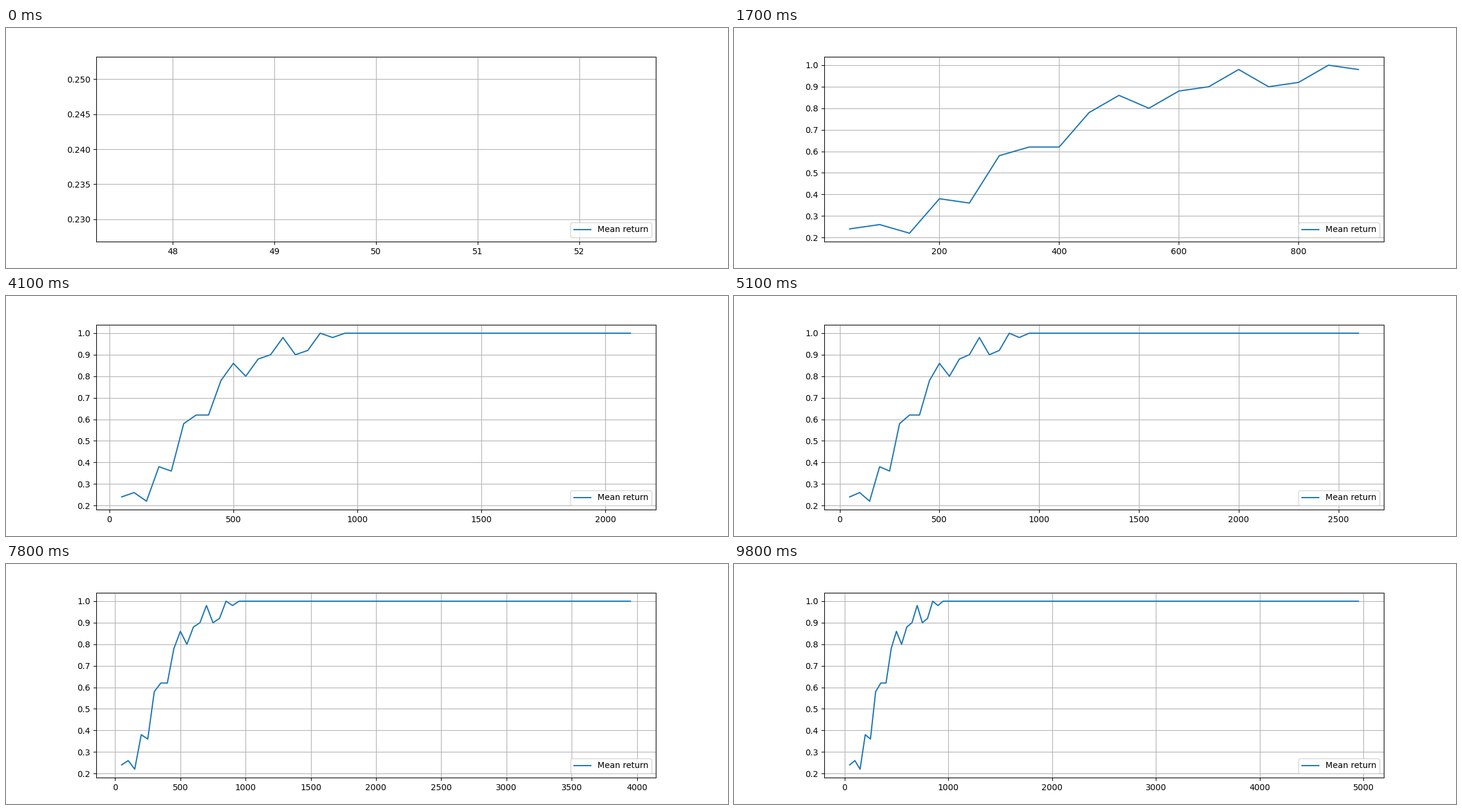
A matplotlib script for the animation above (9.9 s loop, 1200x400 px).

```python
import matplotlib.pyplot as plt
import numpy as np
from matplotlib.animation import FuncAnimation

FRAMES = 99
STEP = 50

# Mean return per evaluation; it stays at 1.0 once learned.
rise = [0.24, 0.26, 0.22, 0.38, 0.36, 0.58, 0.62, 0.62, 0.78,
        0.86, 0.80, 0.88, 0.90, 0.98, 0.90, 0.92, 1.00, 0.98]
returns = np.ones(FRAMES)
returns[:len(rise)] = rise
steps = STEP * np.arange(1, FRAMES + 1)

fig, ax = plt.subplots(figsize=(12, 4), dpi=100)
line, = ax.plot([], [], color="tab:blue", label="Mean return")
ax.grid(True)
ax.legend(loc="lower right")


def update(frame):
    count = frame + 1
    line.set_data(steps[:count], returns[:count])
    ax.relim()
    ax.autoscale_view()
    return line,


def reset():
    return update(0)


anim = FuncAnimation(fig, update, frames=FRAMES, init_func=reset,
                     interval=100, repeat=True, repeat_delay=0, blit=False)
plt.show()
```
